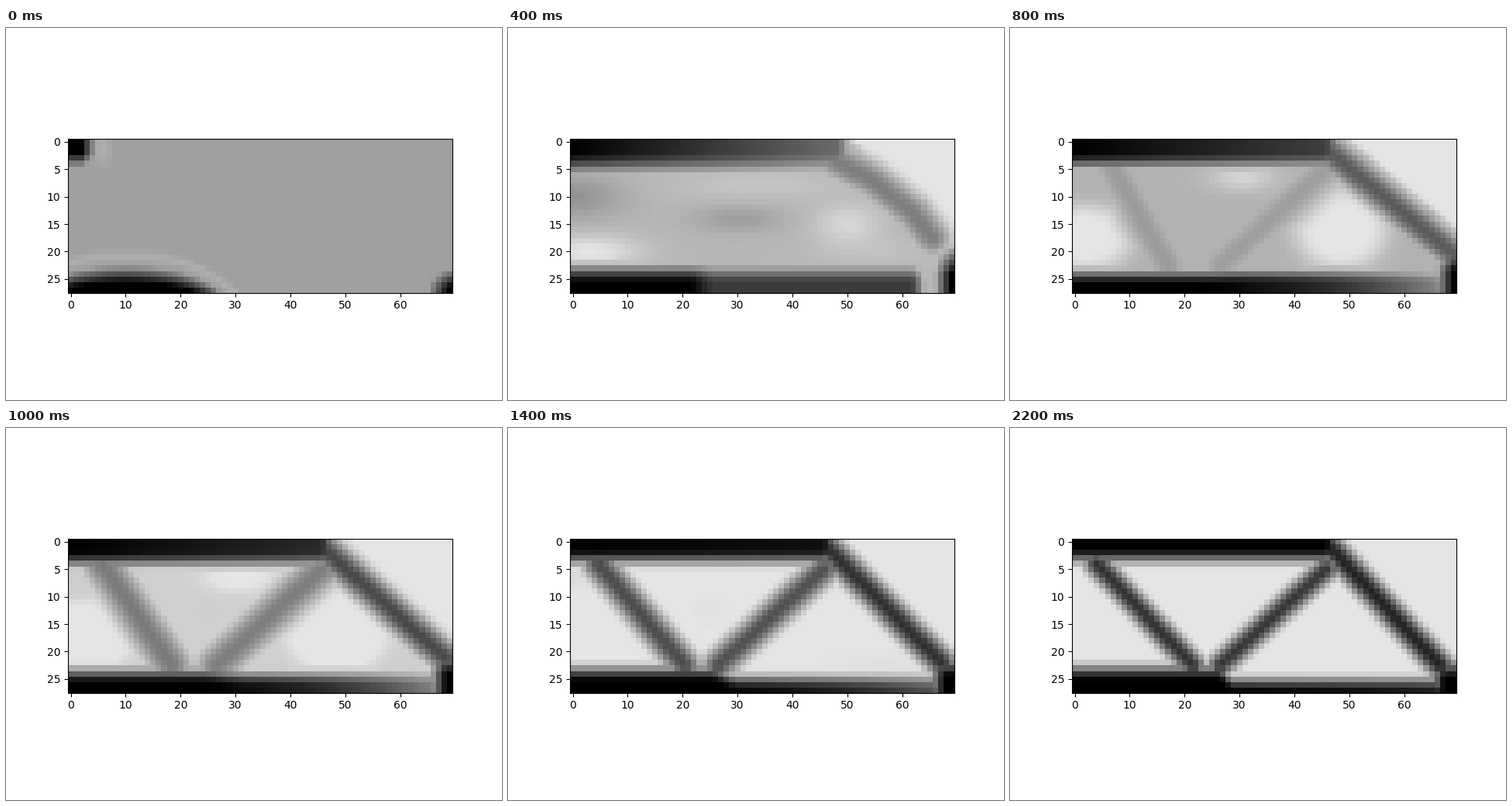
Recreate the animation shown at these times as a matplotlib script. Size 640 px wide and 480 px high, loop 6000 ms.

```python
import numpy as np
import matplotlib.pyplot as plt
from matplotlib.animation import FuncAnimation

COLS, ROWS = 70, 28
VOID = 229      # grey of empty cells, 0 is solid
SOFT = 4.2      # width of a blurred edge, in cells
CLOUD, TRUSS, LAST = 2, 4, 11
X, Y = np.meshgrid(np.arange(COLS), np.arange(ROWS))
UP = ROWS - 1 - Y


def smooth(v):
    v = np.clip(v, 0, 1)
    return v * v * (3 - 2 * v)


def bump(x, y, rx, ry, power=1):
    return np.exp(-(((X - x) / rx) ** 2 + ((Y - y) / ry) ** 2) ** power)


def shade(grey, amount):
    return VOID - (VOID - grey) * amount


def bar(width, grey, *pts):
    """Soft strut along a polyline."""
    d = np.full(X.shape, np.inf)
    for (x0, y0), (x1, y1) in zip(pts, pts[1:]):
        dx, dy = x1 - x0, y1 - y0
        t = np.clip(((X - x0) * dx + (Y - y0) * dy) / (dx * dx + dy * dy), 0, 1)
        d = np.minimum(d, np.hypot(X - x0 - t * dx, Y - y0 - t * dy))
    return shade(grey, smooth(1 - d / width))


def slab(dist, depth, grey, end, soft=SOFT):
    """Layer along the top or bottom edge, fading out at column end."""
    return shade(grey, smooth(0.5 - (dist - depth) / soft) * smooth(0.5 - (X - end) / SOFT))


def corner(x0, wx, y0, wy):
    return shade(0, np.clip((X - x0) / wx, 0, 1) * np.clip((Y - y0) / wy, 0, 1))


def clear_right(z, edge):
    return z + (VOID - z) * np.clip((X - edge) / 2 + 0.5, 0, 1)


def stack(*layers):
    return np.minimum.reduce(layers)


def seed():
    top = 21.3 + 0.009 * (X - 10) ** 2 + 2e-5 * (X - 10) ** 4
    d = (Y - top) / SOFT
    halo = 14 * np.exp(-((d + 0.1) / 0.2) ** 2) + 16 * bump(5.8, 1.2, 1.4, 2.5)
    return stack(160 + halo, shade(0, np.clip(d, 0, 1)),
                 corner(5.5, -3.5, 5.6, -3.5), corner(63.5, 5.3, 21.5, 5))


def cloud():
    z = 182 + 48 * bump(3, 20, 9, 3) + 32 * bump(50, 15, 6, 3.5) + 14 * bump(34, 8, 16, 3)
    z += 10 * bump(55, 20, 12, 3) - 24 * bump(30, 14, 8, 2.5) - 35 * bump(0, 10, 9, 4)
    z = clear_right(z, 51 + 1.2 * Y - 0.013 * Y ** 2)
    return stack(z, bar(5.5, 125, (48, 3.5), (54.5, 7), (62, 13), (65.5, 17.5)),
                 slab(Y, 4.7, 2.2 * X, 50, 6),
                 slab(UP, 3.7, 60 * smooth((X - 21) / 5), 63.5, 5),
                 corner(65, 4, 18, 6))


def truss(k):
    """Layout from first holes (k = 0) to the finished beam (k = 1)."""
    passing = np.exp(-((k - 0.57) / 0.13) ** 2)
    x0, x1, y1 = 46 + k, 69 - 2.5 * k, 20.5 + 2 * k

    z = 178 + 51 * min(1, 1.75 * k)
    z = z + 58 * bump(2, 17.5, 8.5, 6, 2) + 58 * bump(48.5, 16, 8.5, 7.5, 2)
    z = np.minimum(z + 34 * bump(30.5, 6.5, 6, 2.5), VOID)
    z = clear_right(z, x0 + 6 + (x1 - x0) * (Y - 1.5) / (y1 - 1.5))
    z -= passing * (75 * bump(0, 6, 6, 2.5) + 30 * bump(25, 12.5, 2.6, 2.4)
                    + 45 * bump(57, 23, 9, 2.5))

    knee = smooth(0.5 + (X - 27.5) / (12 - 9 * k))
    tail = (125 - 100 * k ** 3) * (X / 65) ** 3
    return stack(z,
                 bar(7 - 3.4 * k, 155 - 105 * k, (6.5 - 2.5 * k, 4), (17 + 4.5 * k, 22.5)),
                 bar(7 - 3.4 * k, 158 - 103 * k, (26.5, 22.5), (45.7, 5)),
                 bar(5 - 1.1 * k, 90 - 55 * k, (x0, 1.5), (x1, y1)),
                 slab(Y, 4.1 - 0.95 * k, 55 * (1 - k) * X / 40, 47.5),
                 slab(UP, 3 + 0.8 * k - (knee * (2.1 * k - 0.2 * (1 - k))), tail * knee, 67.5),
                 corner(64.9 - 0.7 * k, 4 - k, 18.5 + 2 * k, 5 - k))


def density(n):
    if n < CLOUD:
        a, b, w = seed(), cloud(), n / CLOUD
    elif n < TRUSS:
        a, b, w = cloud(), truss(0), (n - CLOUD) / (TRUSS - CLOUD)
    else:
        left = max(0, (LAST - n) / (LAST - TRUSS))
        return truss(1 - left ** 2.5)
    return a * (1 - w) + b * w


fig, ax = plt.subplots(figsize=(6.4, 4.8), dpi=100)
im = ax.imshow(density(0), cmap="gray", vmin=0, vmax=255, interpolation="nearest")


def update(n):
    im.set_data(density(n))
    return [im]


anim = FuncAnimation(fig, update, frames=30, interval=200, repeat=True, repeat_delay=0)
plt.show()
```
